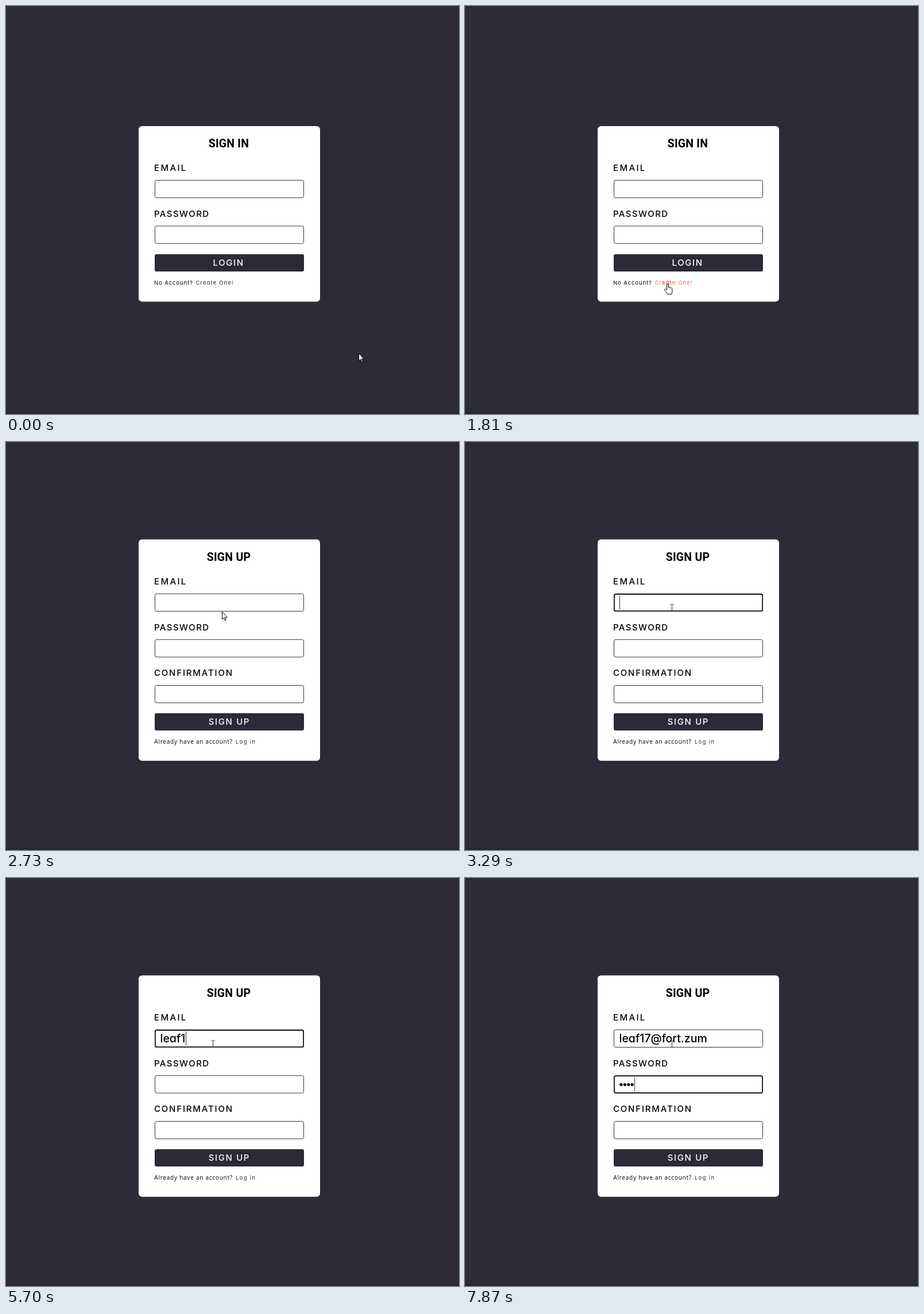
Animation of 789x710 px, one loop 8 s. Source, as an HTML page:

```html
<!DOCTYPE html>
<html lang="en">
<head>
<meta charset="utf-8">
<title>Sign up form</title>
<style>
  html, body { margin: 0; width: 100%; height: 100%; overflow: hidden; background: #2c2b37; }
  svg { display: block; width: 789px; height: 710px; }
  text { font-family: Inter, "Open Sans", sans-serif; font-feature-settings: "cv11"; white-space: pre; }
  .title { font: 700 19.5px Roboto, sans-serif; letter-spacing: .2px; text-anchor: middle; }
  .label { font-size: 15px; font-weight: 500; }
  .button { font-size: 15px; font-weight: 500; letter-spacing: 1.6px; fill: #fff; }
  .note { font-size: 9.5px; letter-spacing: .9px; }
  .plain { font: 10px "Open Sans", sans-serif; letter-spacing: .77px; }
  .link { fill: #2c2b37; letter-spacing: 1.1px; }
  .hover { fill: #f0702e; }
  .hover .hot { fill: #d3263f; }
  .typed { font-size: 19.5px; font-weight: 500; }
  .field { fill: #fff; stroke: #33323b; }
  .ring { fill: none; stroke: #0c0c10; stroke-width: 1.7; }
  .cursor path { fill: #fff; stroke: #000; stroke-linejoin: round; }
  .cursor #ibeam { fill: none; stroke: #222; }
</style>
</head>
<body>
<svg viewBox="0 0 789 710">
  <rect width="789" height="710" fill="#2c2b37"/>
  <rect y="706" width="789" height="4" fill="#2a2631"/>
  <g id="signIn"></g>
  <g id="signUp"></g>
  <g id="entry">
    <rect id="ring" class="ring" x="259.9" width="258.2" height="29.4" rx="2.5"/>
    <text id="email" class="typed" x="268.5" y="286"></text>
    <g id="dots"></g>
    <rect id="caret" x="269" width="1" height="24" fill="#333"/>
  </g>
  <g id="cursor" class="cursor">
    <path id="arrow" d="M.5 .5V13.5L3.4 10.8L5.4 15.4L7.2 14.6L5.2 10.1H9.3Z"/>
    <path id="hand" d="M-1.5 11V2a1.5 1.5 0 0 1 3 0V7Q3 5.8 4.2 7.2Q5.8 6.4 6.4 8Q8 7.8 8 9.7V13Q8 15 6.8 18.5H-.3Q-1 16 -3.5 13.7L-5.3 11.2Q-5.5 9 -3.5 9.4Z"/>
    <path id="ibeam" d="M-2.5 -5.5H-.5L.5 -4.5L1.5 -5.5H3.5M.5 -4.5V5.5M-2.5 6.5H-.5L.5 5.5L1.5 6.5H3.5"/>
  </g>
</svg>
<script>
  const LOOP = 8000, SWITCH = 1940, HOVER = 1730;
  const $ = id => document.getElementById(id);
  const show = (el, on) => el.setAttribute('visibility', on ? 'visible' : 'hidden');

  const card = (y, h) => `<rect x="231" y="${y}" width="316" height="${h}" rx="6" fill="#fff"/>`;
  const text = (cls, x, y, s, gap) =>
    `<text class="${cls}" x="${x}" y="${y}"${gap ? ` style="letter-spacing:${gap}px"` : ''}>${s}</text>`;
  const field = (name, y, gap) => text('label', 258, y - 16, name, gap) +
    `<rect class="field" x="259.5" y="${y + .3}" width="259" height="30.4" rx="3"/>`;
  const button = (name, x, y) =>
    `<rect x="259" y="${y}" width="260" height="30" rx="3" fill="#2b2a37"/>` + text('button', x, y + 20, name);

  $('signIn').innerHTML = card(209, 305.5) + text('title', 388, 246, 'SIGN IN') +
    field('EMAIL', 303, 2.35) + field('PASSWORD', 382.6, 1.4) + button('LOGIN', 360.5, 432) +
    text('note', 258, 485, 'No Account?') +
    text('note link', 330.5, 485, 'Cr<tspan class="hot">eat</tspan>e One!');
  $('signUp').innerHTML = card(169.5, 385.2) + text('title', 388, 206.5, 'SIGN UP') +
    field('EMAIL', 263.8, 2.35) + field('PASSWORD', 343.5, 1.4) + field('CONFIRMATION', 423.2, 1.8) +
    button('SIGN UP', 352.8, 472) +
    text('note plain', 258.3, 525, 'Already have an account?') +
    text('note link', 400, 525, 'Log in', 1.3);
  $('dots').innerHTML = [0, 1, 2, 3].map(i => `<circle cx="${271.8 + i * 6.5}" cy="359.5" r="2.6"/>`).join('');

  const link = document.querySelector('#signIn .link');
  const dots = [...$('dots').children];

  // first step, last step, step count, x, y
  const moves = [
    [130, 870, 11, 363, 493],
    [950, 1330, 6, 355, 484],
    [1560, 1560, 1, 353, 483],
    [2020, 2500, 7, 379, 286],
    [2580, 2730, 3, 376, 295],
    [2900, 3050, 3, 360, 288]
  ];
  const address = 'leaf17@fort.zum';
  // times at which each character count is reached
  const emailKeys = [[4610, 1], [4680, 2], [4750, 3], [4820, 4], [5700, 5], [5780, 6], [6010, 7],
    [6480, 9], [6560, 11], [6630, 12], [6790, 13], [6860, 14], [6950, 15]];
  const dotKeys = [[7500, 1], [7570, 2], [7630, 3], [7870, 4]];
  const caretOff = [[3750, 4290], [5400, 5700]];

  const count = (keys, t) => keys.reduce((n, [at, k]) => t >= at ? k : n, 0);
  const ease = p => p * p * (3 - 2 * p);

  function pointer(t) {
    let x = 614, y = 604;
    for (const [a, b, n, tx, ty] of moves) {
      if (t < a) break;
      const step = n > 1 ? Math.floor((t - a) / (b - a) * (n - 1) + 1e-6) + 1 : 1;
      const p = ease(Math.min(1, step / n));
      x += (tx - x) * p;
      y += (ty - y) * p;
    }
    return [Math.round(x), Math.round(y)];
  }

  function pointerKind(x, y, up) {
    const inside = (top, bottom) => y >= top && y < bottom;
    if (!up) return x > 330 && x < 396 && inside(472, 490) ? 'hand' : 'arrow';
    if (inside(472, 502)) return 'hand';
    return [264, 344, 423].some(top => inside(top, top + 31)) ? 'ibeam' : 'arrow';
  }

  function draw(t) {
    const up = t >= SWITCH, second = t >= 7100;
    show($('signIn'), !up);
    show($('signUp'), up);
    link.classList.toggle('hover', t >= HOVER);

    show($('ring'), t >= 3200);
    $('ring').setAttribute('y', second ? 344.5 : 264.8);
    const typed = address.slice(0, count(emailKeys, t)), filled = count(dotKeys, t);
    $('email').textContent = typed;
    dots.forEach((d, i) => show(d, i < filled));

    const width = second ? filled * 6.5 : typed ? $('email').getComputedTextLength() : 0;
    $('caret').setAttribute('x', 269 + Math.round(width));
    $('caret').setAttribute('y', second ? 347 : 267);
    show($('caret'), t >= 3290 && !caretOff.some(([a, b]) => t >= a && t < b));

    const [x, y] = pointer(t), kind = pointerKind(x, y, up);
    $('cursor').setAttribute('transform', `translate(${x} ${y})`);
    for (const id of ['arrow', 'hand', 'ibeam']) show($(id), id === kind);
  }

  const start = performance.now();
  function tick() {
    draw((performance.now() - start) % LOOP);
    requestAnimationFrame(tick);
  }
  tick();
</script>
</body>
</html>
```
